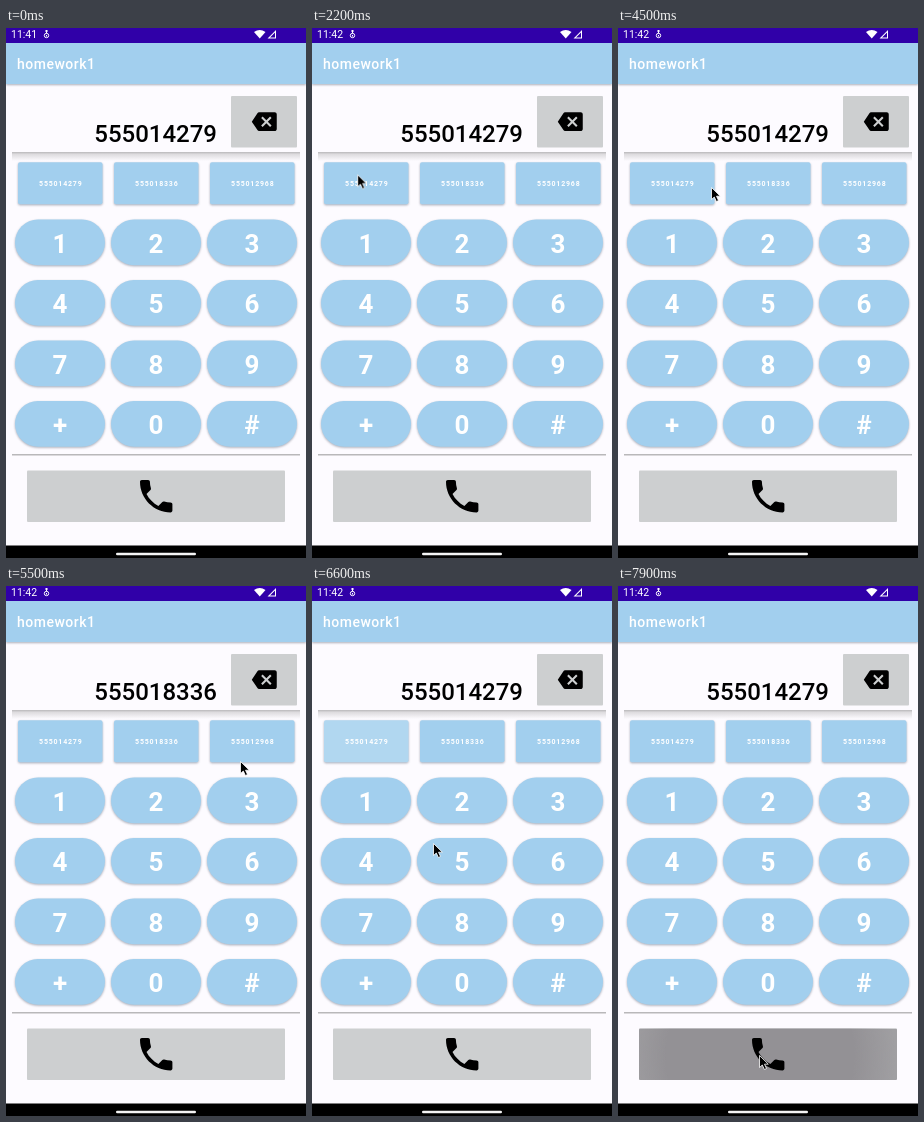
An HTML page that plays this animation: 300 by 530 pixels, repeating every 8000 ms.

```html
<!DOCTYPE html>
<html lang="en">
<head>
<meta charset="utf-8">
<title>Dialer</title>
<style>
html, body { margin: 0; width: 100%; height: 100%; overflow: hidden; background: #fdfbff; }
svg { display: block; width: 300px; height: 530px; font-family: Roboto, "Open Sans", sans-serif; }
.blue { fill: #a2cfee; }
.grey { fill: #cdcfd0; }
.raised { filter: drop-shadow(0 1px 1px rgba(40, 50, 70, .38)); }
.key { font-size: 26px; font-weight: 700; fill: #fff; text-anchor: middle; }
.quick { font-size: 7px; font-weight: 700; letter-spacing: .8px; fill: #fff; text-anchor: middle; }
.number { font-size: 24px; font-weight: 500; text-anchor: end; }

.early, .late, .number, .cursor, .ripple, .press, .wave { animation: 8s step-end infinite; }
.early { animation-name: early; }
.late { animation-name: late; }
.n0 { animation-name: n0; }
.n1 { animation-name: n1; }
.n2 { animation-name: n2; }
.cursor { animation-name: move, show; }
.ripple { fill: #fff; }
.r0 { animation-name: r0; }
.r1 { animation-name: r1; }
.r2 { animation-name: r2; }
.press { animation-name: press; }
.wave { animation-name: wave; transform-origin: 142px 470px; }

@keyframes early { 0% { opacity: 1 } 1.25%, 100% { opacity: 0 } }
@keyframes late { 0% { opacity: 0 } 1.25%, 100% { opacity: 1 } }
@keyframes n0 { 0% { opacity: 1 } 62.5% { opacity: 0 } 80%, 100% { opacity: 1 } }
@keyframes n1 { 0% { opacity: 0 } 62.5% { opacity: 1 } 73.75%, 100% { opacity: 0 } }
@keyframes n2 { 0% { opacity: 0 } 73.75% { opacity: 1 } 80%, 100% { opacity: 0 } }
@keyframes show { 0% { opacity: 0 } 5%, 100% { opacity: 1 } }

/* each stretch advances once per 100 ms */
@keyframes move {
  0% { transform: translate(148px, 2px) }
  5% { transform: translate(148px, 2px); animation-timing-function: steps(4) }
  10% { transform: translate(106px, 238px) }
  11.25% { transform: translate(106px, 238px); animation-timing-function: steps(4) }
  16.25% { transform: translate(36px, 112px); animation-timing-function: steps(7) }
  25% { transform: translate(44px, 142px); animation-timing-function: steps(7) }
  33.75% { transform: translate(48px, 157px); animation-timing-function: steps(7) }
  42.5% { transform: translate(50px, 159px); animation-timing-function: steps(6) }
  50% { transform: translate(55px, 159px); animation-timing-function: steps(5) }
  56.25% { transform: translate(93px, 159px); animation-timing-function: steps(4) }
  61.25% { transform: translate(148px, 161px); animation-timing-function: steps(2) }
  63.75% { transform: translate(151px, 161px); animation-timing-function: steps(4) }
  68.75% { transform: translate(234px, 175px); animation-timing-function: steps(2) }
  71.25% { transform: translate(239px, 163px); animation-timing-function: steps(2) }
  73.75% { transform: translate(238px, 162px); animation-timing-function: steps(4) }
  78.75% { transform: translate(60px, 158px); animation-timing-function: steps(1) }
  80% { transform: translate(62px, 161px); animation-timing-function: steps(2) }
  82.5% { transform: translate(121px, 257px); animation-timing-function: steps(6) }
  90% { transform: translate(146px, 468px); animation-timing-function: steps(3) }
  93.75%, 100% { transform: translate(141px, 469px) }
}
@keyframes r0 {
  0% { opacity: 0 } 80% { opacity: .12 } 81.25% { opacity: .2 }
  82.5% { opacity: .17 } 83.75% { opacity: .1 } 85% { opacity: .04 } 86.25%, 100% { opacity: 0 }
}
@keyframes r1 {
  0% { opacity: 0 } 62.5% { opacity: .12 } 63.75% { opacity: .2 }
  65% { opacity: .15 } 66.25% { opacity: .07 } 67.5%, 100% { opacity: 0 }
}
@keyframes r2 {
  0% { opacity: 0 } 73.75% { opacity: .12 } 75% { opacity: .2 }
  76.25% { opacity: .15 } 77.5% { opacity: .07 } 78.75%, 100% { opacity: 0 }
}
@keyframes press {
  0% { opacity: 0 } 95% { opacity: .3 } 96.25% { opacity: .6 }
  97.5% { opacity: .85 } 98.75%, 100% { opacity: 1 }
}
@keyframes wave {
  0% { transform: scale(0) } 95% { transform: scale(.3) } 96.25% { transform: scale(.55) }
  97.5% { transform: scale(.8) } 98.75%, 100% { transform: scale(1) }
}
</style>
</head>
<body>
<svg viewBox="0 0 300 530">
  <defs>
    <linearGradient id="fade" x2="0" y2="1">
      <stop offset="0" stop-color="#b9b8ba"/>
      <stop offset=".25" stop-color="#dddbde"/>
      <stop offset="1" stop-color="#fdfbff"/>
    </linearGradient>
    <radialGradient id="glow">
      <stop offset=".7" stop-color="#939195"/>
      <stop offset="1" stop-color="#939195" stop-opacity="0"/>
    </radialGradient>
    <clipPath id="call"><rect x="21" y="442.5" width="258" height="51.5" rx="1"/></clipPath>
  </defs>

  <rect width="300" height="530" fill="#fdfbff"/>
  <rect class="blue raised" y="14" width="300" height="42"/>
  <rect width="300" height="15" fill="#3000a8"/>
  <g fill="#fff" font-size="10.5">
    <text class="early" x="5" y="10.3">11:41</text>
    <text class="late" x="5" y="10.3">11:42</text>
    <path d="M248 4Q253.700 0 259.500 4L253.750 10.500Z"/>
    <path d="M270 2V10.500H261.500ZM269 4.500L264 9.500H269Z" fill-rule="evenodd"/>
    <g fill="none" stroke="#fff">
      <circle cx="40.500" cy="7.500" r="2.200"/>
      <path d="M40.500 2V5.500M39 3H42M40.500 7V8.500"/>
    </g>
    <text x="11" y="41" font-size="14" font-weight="500" letter-spacing=".5">homework1</text>
  </g>

  <rect x="6" y="124" width="288" height="9" fill="url(#fade)"/>
  <rect x="6" y="426" width="288" height="1.500" fill="#b9b8ba"/>
  <rect class="grey" x="225" y="68" width="66" height="51.500" rx="1"/>
  <path transform="translate(245.800 81.200) scale(1.04)" d="M22 3H7c-.69 0-1.230.35-1.590.88L0 12l5.410 8.110c.36.53.9.89 1.590.89h15c1.100 0 2-.9 2-2V5c0-1.100-.9-2-2-2zm-3 12.590L17.590 17 14 13.410 10.410 17 9 15.590 12.590 12 9 8.410 10.410 7 14 10.590 17.590 7 19 8.410 15.410 12z"/>
  <g id="pad"></g>

  <rect class="grey" x="21" y="442.500" width="258" height="51.500" rx="1"/>
  <g class="press" clip-path="url(#call)">
    <rect x="21" y="442" width="258" height="52" fill="#a09fa2"/>
    <circle class="wave" cx="142" cy="470" r="135" fill="url(#glow)"/>
  </g>
  <path transform="translate(128.600 446.600) scale(1.8)" d="M6.620 10.790c1.440 2.830 3.760 5.140 6.590 6.590l2.200-2.200c.27-.27.67-.36 1.020-.24 1.120.37 2.330.57 3.570.57.55 0 1 .45 1 1V20c0 .55-.45 1-1 1-9.390 0-17-7.610-17-17 0-.55.45-1 1-1h3.500c.55 0 1 .45 1 1 0 1.250.2 2.450.57 3.570.11.35.03.74-.25 1.020z"/>

  <rect y="517.500" width="300" height="12.500"/>
  <rect x="110" y="524.700" width="80" height="2.600" rx="1.300" fill="#f4f4f4"/>
  <path class="cursor" d="M.5 .5V12.500L3.300 10L5.400 14.500L7.500 13.500L5.500 9.200H9.300Z" stroke="#fff" stroke-width=".8"/>
</svg>
<script>
const pad = document.getElementById("pad");
const quick = ["555014279", "555018336", "555012968"];
const columns = [9, 105, 201];

const box = (cls, x, y, w, h, r) =>
  `<rect class="${cls}" x="${x}" y="${y}" width="${w}" height="${h}" rx="${r}"/>`;
const label = (cls, x, y, text) => `<text class="${cls}" x="${x}" y="${y}">${text}</text>`;

let parts = quick.map((number, i) => {
  const x = columns[i] + 3;
  return label(`number n${i}`, 211, 114.3, number) +
    box("blue raised", x, 134.3, 84.5, 42, 2) +
    box(`ripple r${i}`, x, 134.3, 84.5, 42, 2) +
    label("quick", x + 42.8, 158, number);
});
parts = parts.concat([..."123456789+0#"].map((key, i) => {
  const x = columns[i % 3], y = 191.5 + 60.5 * Math.floor(i / 3);
  return box("blue raised", x, y, 90, 45.8, 22.9) + label("key", x + 45, y + 33.2, key);
}));
pad.innerHTML = parts.join("");
</script>
</body>
</html>
```
